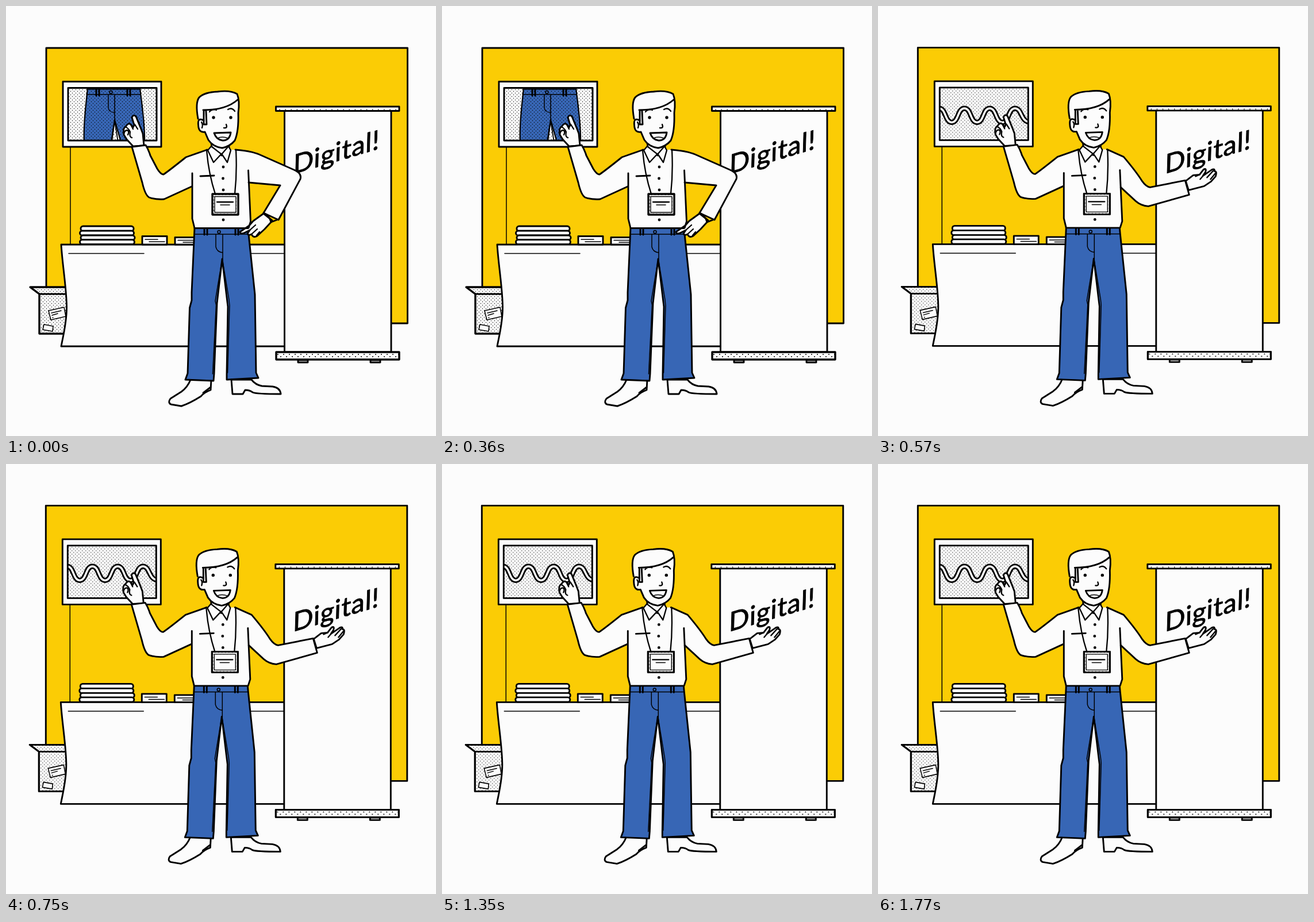
Write an HTML page that moves like this. It is 748x748 px and loops after 1800 ms.

```html
<!DOCTYPE html>
<html lang="en">
<head>
<meta charset="utf-8">
<title>Digital booth</title>
<style>
  html, body { margin: 0; width: 100%; height: 100%; overflow: hidden; background: #fcfcfc; }
  svg { display: block; width: 100%; height: 100%; stroke: #000; stroke-width: 2.9; stroke-linejoin: round; stroke-linecap: round; }
  .paper { fill: #fcfcfc; }
  .blue { fill: #3766b5; }
  .line { fill: none; }
  .fine { fill: none; stroke-width: 2.3; }
  .thin { fill: none; stroke-width: 1.5; }
  .ink { fill: #000; stroke: none; }
  .dots { fill: url(#dots); }
  .sparse { fill: url(#sparse); }
  text { font: 400 46.5px Lato, sans-serif; letter-spacing: .7px; fill: #000; stroke-width: .9; }
</style>
</head>
<body>
<svg viewBox="0 0 748 748">
  <defs>
    <pattern id="dots" width="6" height="6" patternUnits="userSpaceOnUse">
      <path d="M1.5 1.5h.01M4.5 4.5h.01" stroke="#000" stroke-width="1.3" stroke-linecap="round"/>
    </pattern>
    <pattern id="sparse" width="10" height="9" x="470" y="602" patternUnits="userSpaceOnUse">
      <path d="M3 4h.01M8 8h.01" stroke="#000" stroke-width="2" stroke-linecap="round"/>
    </pattern>
    <clipPath id="screen"><path d="M108 142.5H262V234H108z"/></clipPath>
    <path id="wave" d="M107 178.500c12 0 10 24.500 22 24.500s10-24.500 22-24.500s10 24.500 22 24.500s10-24.500 22-24.500s10 24.500 22 24.500s10-24.500 22-24.500s10 23 25 24"/>
  </defs>

  <g id="scene">
    <path d="M70 73H698.5V552H70z" fill="#fbcc05"/>
    <path class="thin" d="M112 245V414"/>

    <!-- wall screen -->
    <path class="paper" d="M99 131.5H270V245H99z"/>
    <g clip-path="url(#screen)">
      <g class="poseA">
        <path class="blue" stroke-width="2.2" d="M142 142C140 168 134 200 136 237H183L189 198L200 237H241C242 205 236 170 233 142z"/>
        <path class="paper" stroke-width="1.8" d="M189 200L184 237H195z"/>
        <path class="thin" d="M141 145H233M140 154H234M189 154V198M178 154V177Q179 185 188 185"/>
        <path class="line" d="M157 144V156M162 144V156M211 144V156M216 144V156"/>
        <circle class="thin" cx="182.500" cy="150" r="2.500"/>
      </g>
      <path class="dots" stroke="none" d="M108 142H262V234H108z"/>
      <g class="poseB line">
        <use href="#wave" stroke-width="9"/>
        <use href="#wave" stroke="#fcfcfc" stroke-width="3.500"/>
      </g>
    </g>
    <path class="line" d="M108 142.5H262V234H108z"/>

    <!-- carton -->
    <path class="paper" d="M42 489H110V570H58V501z"/>
    <path class="dots" d="M42 489H110V570H58V501z"/>
    <path class="line" d="M58 501H110"/>
    <path class="paper" stroke-width="1.6" d="M74 530L101 524L104 540L78 546zM66 554L82 557L81 566L64 563z"/>
    <path class="thin" d="M79 534L96 530M80 538L90 535M81 542h1"/>

    <!-- table and goods -->
    <path class="paper" d="M484 415H96C98 450 105 488 105.500 522C106 550 99 575 96 592H484"/>
    <path class="thin" d="M109 430.5H240M425 430.5H484"/>
    <g class="paper">
      <rect x="130" y="383" width="92" height="8.500" rx="4"/>
      <rect x="128.500" y="391" width="94" height="8" rx="4"/>
      <rect x="130" y="399" width="94" height="8" rx="4"/>
      <rect x="128.500" y="406.500" width="95" height="8" rx="4"/>
      <path d="M237 400.5H280V415H237zM294 402.5H330V415H294z"/>
    </g>
    <path class="thin" d="M242 406H264M249 410H276M299 407.500H326M308 411H326"/>

    <!-- roll-up banner -->
    <path class="paper" d="M484.500 182H670V602H484.500z"/>
    <path class="paper" d="M469.500 175H684V182.500H469.500zM470 602H684V615H470zM508 616H525V620H508zM634 616H651V620H634z"/>
    <path class="sparse" d="M470 602H684V615H470z"/>
    <path class="line" stroke-width="1.6" stroke-dasharray=".1 10" d="M476 180H682"/>
    <text transform="matrix(1 -.295 -.03 1 499.500 292.500)">Digital!</text>

    <!-- shoes and trousers -->
    <path class="paper" d="M321 650Q316 663 305 671L286 683Q281 690 287 693L305 696Q320 691 339 679Q345 672 356 668L357 650zM392 650L394 675H412L416 668Q424 668 429 672Q435 675 478 675Q477 664 464 662L445 661Q434 659 427 650z"/>
    <path class="line" d="M343 673L356 663"/>
    <path class="blue" d="M328 386L323 498V512L319.500 525L316 639L312 650L361 652L362 640L367 517L376 440L385 515L386 523L384 640V650L439 647L435 638L433 502L422 397L421 386z"/>
    <path class="thin" d="M375 446L364 513L365.500 520L359.500 640M377 444L388 511L389 521L385.500 638M328 397H421M377 397V442M365 397V419Q367 428 377 429"/>
    <path class="line" d="M345 387V398M350 387V398M399 387V398M404 387V398"/>
    <circle class="thin" cx="370.500" cy="393" r="2.500"/>

    <!-- shirt and arms -->
    <path class="paper" stroke="none" d="M350 250L313 263L324 291V370L328 386H423L426 376L421 287L428 262L399 250z"/>
    <path class="paper" d="M221 244L210 232L205 224Q203 212 208 210Q213 202 217 206L221 211L223 207L219 194Q221 188 226 192L235 214L238 222L240 243z"/>
    <path class="fine" d="M207 210Q213 212 216 219M205 223Q206 216 211 216Q215 218 212 224M217 206L221 214M224 206L229 214M216 219Q214 228 219 229"/>
    <path class="paper" d="M350 250L313 263Q283 287 274 293Q269 293 263 283L251 260Q248 250 243 242L219 245L237 307Q242 329 249 333Q260 337 275 336L323 314"/>

    <g class="poseA paper">
      <path d="M399 250Q425 252 440 258L501 285Q515 291 512 301L474 372L448 360L477 312L422 307"/>
      <path d="M448 361L430 374L423 382L407 393Q408 398 416 394L424 390L420 396Q422 400 427 397Q430 404 437 400L450 388L461 376L463 373z"/>
      <path class="fine" d="M424 390L434 381M427 397L437 388M436 399L441 393"/>
      <path class="line" d="M448 360Q458 364 461 376L474 371"/>
    </g>
    <g class="poseB paper">
      <path d="M536 305L549 295L560 294L567 285Q573 282 570 290L566 296L582 285Q587 283 586 288Q591 288 588 297L580 306L568 314L541 321z"/>
      <path d="M399 250L428 263Q450 289 460 305Q467 315 474 316L535 304L542 329L471 349Q458 348 449 340L423 316"/>
      <path class="fine" d="M566 296L561 302M584 287L573 299M588 291L579 302M560 294L553 297"/>
    </g>

    <path class="line" d="M324 291V370L328 386.500H421M421.500 286L425.500 375L422 386M338 296L362 295"/>

    <!-- neck, lanyard, badge -->
    <path class="paper" d="M357 237L358 246L375 260L388 246V237z"/>
    <path class="paper" stroke-width="2.3" d="M357 244L351 251L361 272L375 257L385 272L391 251L387 244L375 258z"/>
    <path class="fine" d="M349 250Q352 290 364 327M400 251Q402 290 398 327"/>
    <g class="ink">
      <circle cx="378" cy="280" r="2.400"/>
      <circle cx="377.500" cy="300" r="2.400"/>
      <circle cx="378" cy="320" r="2.400"/>
      <circle cx="378" cy="372" r="2.400"/>
    </g>
    <path class="paper" d="M359 327H404V363H359z"/>
    <path class="dots" d="M359 327H404V363H359z"/>
    <path class="paper" stroke-width="1.4" d="M363 331.500H400V359H363z"/>
    <path class="fine" d="M367 341H395"/>
    <path class="thin" d="M373 346H389"/>

    <!-- head -->
    <path class="paper" d="M344 199Q333 193 334.500 207Q335 221 346 219L352 233Q360 245 376 247Q390 244 398 234Q405 218 404 186Q407 165 402 153Q390 146 368 149Q345 150 336 159Q329 168 334 196"/>
    <path class="line" d="M343 181Q383 181 403 163M344 182V206H349L348 183"/>
    <path class="fine" d="M340 202Q343 206 341 212M354 184Q359 178 366 181M386 180Q393 176 398 183M383 206Q386 213 379 212"/>
    <g class="ink">
      <circle cx="361" cy="194" r="2.700"/>
      <circle cx="391" cy="194" r="2.700"/>
    </g>
    <path class="paper" d="M362 221L391 220Q389 234 377 234Q366 233 362 221z"/>
    <path class="thin" d="M368 230Q376 226 386 230"/>
  </g>
</svg>
<script>
  const LOOP = 1800, SWITCH = 450;
  const scene = document.getElementById('scene');
  const poses = ['.poseA', '.poseB'].map(name => document.querySelectorAll(name));

  function draw(now) {
    const active = now % LOOP < SWITCH ? 0 : 1;
    poses.forEach((parts, i) => parts.forEach(part => {
      part.style.display = i === active ? '' : 'none';
    }));
    // The whole drawing sits slightly higher and further left in the second pose.
    scene.setAttribute('transform', active ? 'translate(-.7 -.6)' : '');
  }

  const start = performance.now();
  function tick() {
    draw(performance.now() - start);
    requestAnimationFrame(tick);
  }
  tick();
</script>
</body>
</html>
```
